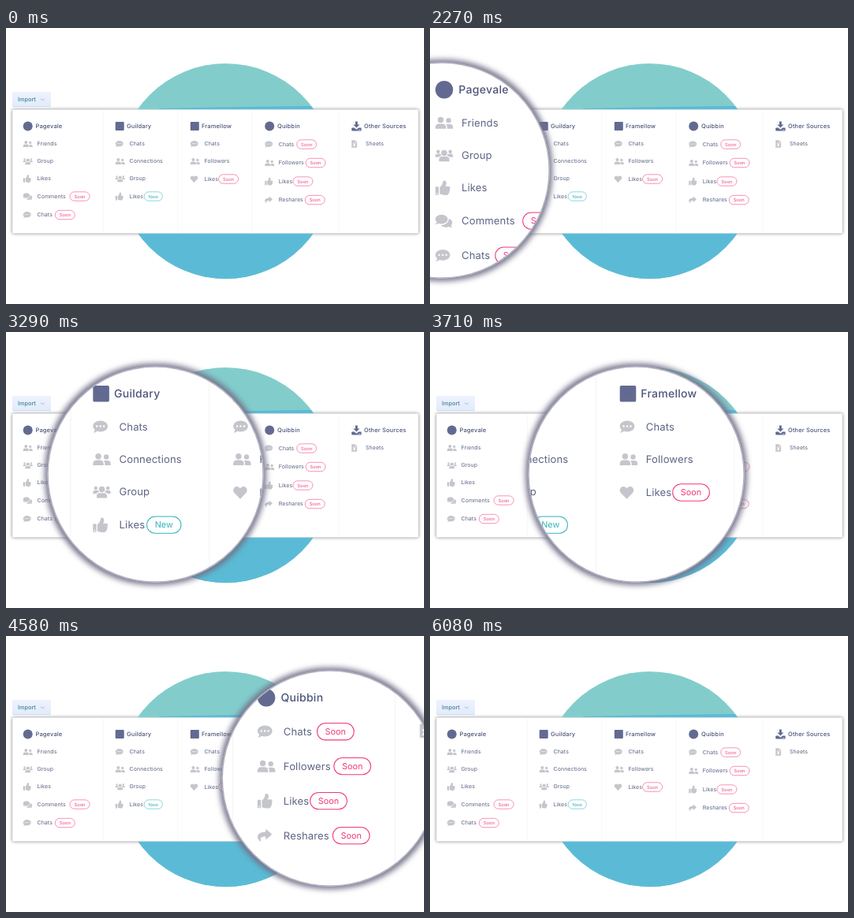
These frames come from a looping animation (530 by 350 pixels, 6150 ms). An HTML page:

```html
<!DOCTYPE html>
<html lang="en">
<head>
<meta charset="utf-8">
<title>Import sources</title>
<style>
  html, body { margin: 0; width: 100%; height: 100%; overflow: hidden; background: #fff; }
  svg { display: block; width: 530px; height: 350px; }
  text { font-family: Inter, "Open Sans", sans-serif; text-rendering: geometricPrecision; }
  .head { font-size: 7.5px; font-weight: 500; fill: #4c5478; letter-spacing: .14px; }
  .item { font-size: 7px; fill: #5d6485; letter-spacing: .06px; }
  .tag { font-size: 5.8px; text-anchor: middle; }
  .icon { fill: #c5c6cc; }
  .mark { fill: #636a91; }
</style>
</head>
<body>
<svg viewBox="0 0 530 350">
  <defs>
    <linearGradient id="btn" x2="0" y2="1">
      <stop stop-color="#edf3fe"/><stop offset="1" stop-color="#e1ebfa"/>
    </linearGradient>
    <filter id="soft" filterUnits="userSpaceOnUse" x="-10" y="60" width="560" height="220">
      <feGaussianBlur stdDeviation="2"/>
    </filter>
    <filter id="glow" filterUnits="userSpaceOnUse" x="-270" y="0" width="1120" height="350" color-interpolation-filters="sRGB">
      <feMorphology in="SourceAlpha" operator="dilate" radius="3"/>
      <feGaussianBlur stdDeviation="3.8" result="halo"/>
      <feFlood flood-color="#717189" flood-opacity=".95"/>
      <feComposite in2="halo" operator="in"/>
      <feMerge><feMergeNode/><feMergeNode in="SourceGraphic"/></feMerge>
    </filter>
    <clipPath id="disc"><circle cx="278.5" cy="181.5" r="136.5"/></clipPath>
    <clipPath id="round"><circle id="hole" cy="180.5" r="137"/></clipPath>
    <clipPath id="wipe"><rect id="shown" y="0" height="350"/></clipPath>
  </defs>

  <rect width="530" height="350" fill="#fff"/>
  <rect x="8" y="103.3" width="515" height="157.2" fill="#000" opacity=".46" filter="url(#soft)"/>
  <g clip-path="url(#disc)">
    <rect x="140" y="40" width="280" height="280" fill="#82cdcc"/>
    <path d="M140 103H194V102L262 100.5 393 98.8H420V320H140z" fill="#5bbbd6"/>
  </g>

  <g id="button">
    <rect x="8" y="81" width="49" height="19" rx="1.5" fill="url(#btn)"/>
    <path d="M8.5 99.6H56.5" stroke="#cfdaec" stroke-width=".8"/>
    <text x="15" y="93.2" font-size="7.3" font-weight="500" fill="#47839c">Import</text>
    <path d="M44 89.6l2.4 2.2 2.4-2.2" fill="none" stroke="#8fa9bd" stroke-width=".8"/>
  </g>

  <g id="panel"></g>

  <g id="lens" filter="url(#glow)">
    <g clip-path="url(#wipe)">
      <g clip-path="url(#round)">
        <rect x="-260" width="1100" height="350" fill="#fff"/>
        <use id="zoomed" href="#panel"/>
      </g>
      <circle id="ring" cy="180.5" r="136.6" fill="none" stroke="#b1b0bf" stroke-width="1.6"/>
    </g>
  </g>
</svg>

<script>
const $ = id => document.getElementById(id);

// Icons start at x = 0 and are centred on y = 0.
const dot = (x, y, r) => `<circle cx="${x}" cy="${y}" r="${r}"/>`;
const path = (d, extra = '') => `<path d="${d}" ${extra}/>`;
const white = 'fill="#fff"';
const icons = {
  friends: dot(3.6, -2, 2) +
    path('M0 4V2.9A2.3 2.3 0 0 1 2.3.6H4.9A2.3 2.3 0 0 1 7.2 2.9V4z') +
    dot(9, -1.6, 1.7) +
    path('M7.2.9H9.8A2.2 2.2 0 0 1 12 3.1V4H8V2.8A3 3 0 0 0 7.2.9z'),
  group: dot(6, -1.6, 2) +
    path('M2.5 4.2V3.1A2.2 2.2 0 0 1 4.7.9H7.3A2.2 2.2 0 0 1 9.5 3.1V4.2z') +
    dot(1.9, -2.5, 1.2) + dot(10.1, -2.5, 1.2) +
    path('M0 1.3V.3A1.4 1.4 0 0 1 1.4-1H2.6Q3.4-1 3.8-.4 4 .4 4.3.6 3-.0 2.3 1.3z') +
    path('M12 1.3V.3A1.4 1.4 0 0 0 10.6-1H9.4Q8.6-1 8.2-.4 8 .4 7.7.6 9-.0 9.7 1.3z'),
  like: '<rect y="-.7" width="2.3" height="5.6" rx=".5"/>' +
    path('M3-.3C4.4-1.5 4.9-2.4 5.1-4 5.3-5.4 7.5-5.2 7.5-3.1 7.5-2.2 7.1-1.6 6.8-1H8.9' +
      'C10.1-1 10.4.4 9.6 1 10.1 1.6 9.9 2.4 9.4 2.7 9.6 3.3 9.3 3.9 8.8 4.1 8.8 4.8 8.3 5 7.4 5H6C4.7 5 4 4.3 3 4.3z') +
    `<g ${white}>${dot(1.15, 3.9, .45)}</g>`,
  chat: path('M5-4.1C7.8-4.1 10-2.5 10-.4S7.8 3.3 5 3.3Q3.8 3.3 2.8 2.9 1.5 4 .2 4 1.2 2.9 1.2 1.9' +
      'C.4 1.2 0 .4 0-.4 0-2.5 2.2-4.1 5-4.1z') +
    `<g ${white}>${dot(2.6, -.4, .65)}${dot(5, -.4, .65)}${dot(7.4, -.4, .65)}</g>`,
  talks: path('M4.2-4.2C6.6-4.2 8.4-2.9 8.4-1.1S6.6 2 4.2 2Q3 2 2.2 1.7 1.2 2.4 0 2.4 1 1.4 1 .6' +
      'C.3.1 0-.5 0-1.1 0-2.9 1.8-4.2 4.2-4.2z') +
    path('M9.1-1.5C10.6-1 11.5 0 11.5 1.3 11.5 2 11.1 2.6 10.6 3 10.6 3.7 11.5 4.6 11.5 4.6' +
      ' 10.2 4.6 9.4 4 9.4 4 6.9 4.7 4.7 4.1 3.8 2.8 6.8 2.9 9.3 1.1 9.1-1.5z'),
  heart: path('M4.7 4.4L.7.3C-.6-1.2.1-3.9 2.2-4 3.4-4.1 4.2-3.3 4.7-2.7 5.2-3.3 6-4.1 7.2-4' +
      ' 9.3-3.9 10-1.2 8.7.3z'),
  share: path('M5.6-4.1Q5.8-4.4 6.2-4.1L9.5-1.1Q9.8-.8 9.5-.5L6.2 2.4Q5.6 2.7 5.5 2.2V.7' +
      'C2.7.7 1.6 1.5 2.3 3.7 2.3 4.1 2 4.1 1.8 4-1.4 1.4-.3-2.3 5.5-2.4V-3.8z'),
  file: path('M.6-4.7H4.4V-2.3H7V4.1Q7 4.7 6.4 4.7H.6Q0 4.7 0 4.1V-4.1Q0-4.7.6-4.7z') +
    path('M5-4.7L7-2.8H5z') +
    path('M2-1L5 3M5-1L2 3', 'stroke="#fff" stroke-width="1.1"'),
  save: path('M4.8-6H7.6V-2H10.2L6.2 2.1 2.2-2H4.8z') +
    path('M.6 2H3.6L5.4 3.7Q6.2 4.3 7 3.7L8.8 2H11.8Q12.4 2 12.4 2.6V5.3Q12.4 6 11.8 6H.6Q0 6 0 5.3V2.6Q0 2 .6 2z') +
    `<g ${white}>${dot(9, 4.7, .5)}${dot(10.6, 4.7, .5)}</g>`,
  disc: dot(6, 0, 6),
  square: '<rect y="-5.5" width="11" height="11" rx="1"/>'
};

// Items: icon, label, y, then optionally tag x and tag text.
const columns = [
  { x: 21.7, head: 37.5, text: 39.5, mark: 'disc', name: 'Pagevale', items: [
    ['friends', 'Friends', 147], ['group', 'Group', 169], ['like', 'Likes', 191],
    ['talks', 'Comments', 213.5, 81], ['chat', 'Chats', 237, 62.3]] },
  { x: 138.7, head: 153, text: 156.5, mark: 'square', name: 'Guildary', items: [
    ['chat', 'Chats', 147], ['friends', 'Connections', 169], ['group', 'Group', 191],
    ['like', 'Likes', 213.5, 175.2, 'New']] },
  { x: 233.8, head: 248, text: 251.5, mark: 'square', name: 'Framellow', items: [
    ['chat', 'Chats', 147], ['friends', 'Followers', 169], ['heart', 'Likes', 191.5, 269.6]] },
  { x: 328.2, head: 344, text: 345.8, mark: 'disc', name: 'Quibbin', items: [
    ['chat', 'Chats', 147.5, 368.6], ['friends', 'Followers', 171, 380],
    ['like', 'Likes', 194.5, 363.9], ['share', 'Reshares', 218, 379.2]] },
  { x: 438.2, head: 454, text: 456, mark: 'save', name: 'Other Sources', items: [
    ['file', 'Sheets', 147]] }
];

const icon = (name, x, y, cls) => `<g class="${cls}" transform="translate(${x} ${y})">${icons[name]}</g>`;
const label = (cls, x, y, s) => `<text class="${cls}" x="${x}" y="${y}">${s}</text>`;

function pill(x, y, word) {
  const isNew = word === 'New';
  const color = isNew ? '#35b3bd' : '#f2387b';
  const w = isNew ? 23.2 : 25;
  return `<rect x="${x}" y="${y - 5.7}" width="${w}" height="11.4" rx="5.7" fill="#fff" stroke="${color}" stroke-width=".55"/>` +
    `<text class="tag" x="${x + w / 2}" y="${y + 2}" fill="${color}">${word}</text>`;
}

function column(c) {
  const rows = c.items.map(([name, s, y, tagX, word = 'Soon']) =>
    icon(name, c.x, y, 'icon') + label('item', c.text, y + 2.4, s) + (tagX ? pill(tagX, y, word) : ''));
  return icon(c.mark, c.x, 124.5, 'mark') + label('head', c.head, 127.3, c.name) + rows.join('');
}

$('panel').innerHTML =
  '<rect x="8" y="103.3" width="515" height="157.2" rx="1" fill="#fff" stroke="#c2c2c8" stroke-width=".4"/>' +
  [123.5, 217.5, 311.5, 421.5].map(x => path(`M${x} 104V260`, 'stroke="#f4f4f7" stroke-width=".6"')).join('') +
  columns.map(column).join('');

const LOOP = 6150, ENTER = 1640, LEAVE = 6080, STEP = 30;
const ZOOM = 1.87, RADIUS = 137.5;

function draw(time) {
  const t = time % LOOP;
  const on = t >= ENTER && t < LEAVE;
  $('lens').style.display = on ? '' : 'none';
  if (!on) return;
  const dt = Math.floor((t - ENTER) / STEP) * STEP;
  const cx = -93.4 + .1715 * dt;
  const right = cx + RADIUS;
  // The lens is uncovered from its right edge while it travels.
  const width = Math.min(2 * RADIUS + 2, 7.5 + .249 * dt);
  $('hole').setAttribute('cx', cx);
  $('ring').setAttribute('cx', cx);
  $('shown').setAttribute('x', right - width);
  $('shown').setAttribute('width', width + 2);
  $('zoomed').setAttribute('transform', `translate(${37.4 - .113 * dt} -154.6) scale(${ZOOM})`);
}

const start = performance.now();
function tick() {
  draw(performance.now() - start);
  requestAnimationFrame(tick);
}
tick();
</script>
</body>
</html>
```
